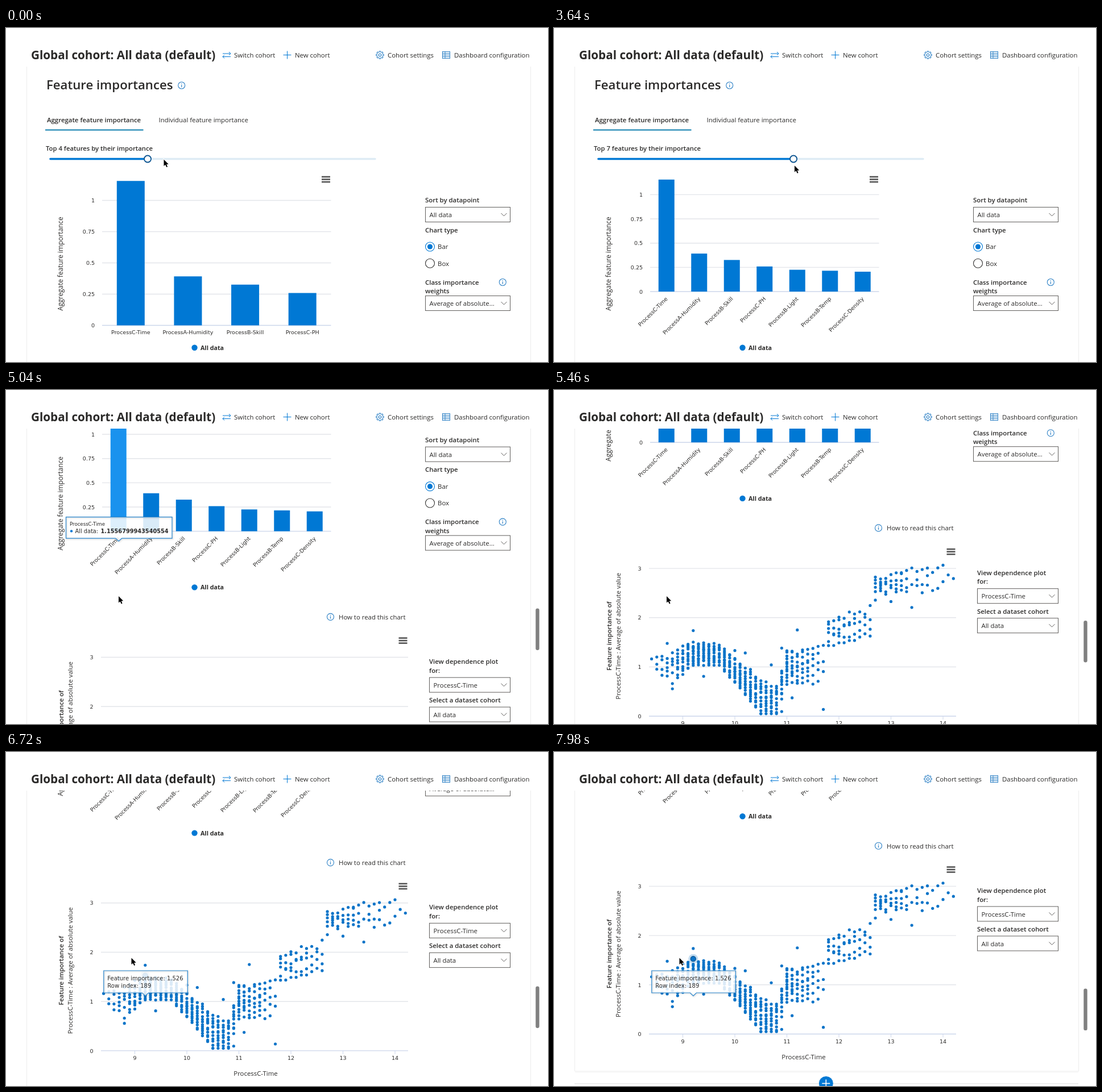
An HTML page with a canvas that plays this animation: 953x588 px, repeating every 8 s.

```html
<!DOCTYPE html>
<html lang="en">
<head>
<meta charset="utf-8">
<title>Feature importances</title>
<style>
  html, body { margin: 0; width: 100%; height: 100%; overflow: hidden; background: #fff; }
  canvas { display: block; }
</style>
</head>
<body>
<canvas id="stage" width="953" height="588"></canvas>
<script>
const ctx = document.getElementById('stage').getContext('2d');
const LOOP = 8000, STEP = 70;
const BLUE = '#0078d4', ICON = '#2f82c6', DOT = '#0b74c8', INK = '#2b2a29', GRID = '#e3e5ea', AXIS = '#ccd6eb';
const ui = (size, weight = 400) => `${weight} ${size}px "Open Sans", "Noto Sans", sans-serif`;
const label = (size, weight = 400) => `${weight} ${size}px "DejaVu Sans", sans-serif`;
const BODY = ui(11.4), STRONG = ui(11.4, 600), TICK = label(9.5);

const clamp = v => Math.max(0, Math.min(1, v));
const progress = (t, from, to) => clamp((t - from) / (to - from));
const mix = (a, b, p) => a + (b - a) * p;
const easeOut = p => 1 - (1 - p) ** 2.05;
const smooth = p => p * p * (3 - 2 * p);

// ---- drawing helpers ----
function text(str, x, y, font = BODY, align = 'left') {
  ctx.font = font;
  ctx.textAlign = align;
  ctx.fillStyle = INK;
  ctx.fillText(str, x, y);
}

function turned(str, x, y, angle, font, align = 'center') {
  ctx.save();
  ctx.translate(x, y);
  ctx.rotate(angle);
  text(str, 0, 0, font, align);
  ctx.restore();
}

function line(color, width, ...points) {
  ctx.strokeStyle = color;
  ctx.lineWidth = width;
  ctx.beginPath();
  for (let i = 0; i < points.length; i += 2) ctx.lineTo(points[i], points[i + 1]);
  ctx.stroke();
}

function circle(x, y, r, fill, stroke, width = 1.1) {
  ctx.beginPath();
  ctx.arc(x, y, r, 0, Math.PI * 2);
  if (fill) { ctx.fillStyle = fill; ctx.fill(); }
  if (stroke) { ctx.strokeStyle = stroke; ctx.lineWidth = width; ctx.stroke(); }
}

function box(color, x, y, width, height) {
  ctx.strokeStyle = color;
  ctx.lineWidth = 1;
  ctx.strokeRect(x + .5, y + .5, width - 1, height - 1);
}

function plus(color, x, y, width) {
  line(color, width, x - 7, y, x + 7, y);
  line(color, width, x, y - 7, x, y + 7);
}

function info(x, y) {
  circle(x, y, 6, null, ICON);
  line(ICON, 1.2, x, y - 1, x, y + 3.2);
  line(ICON, 1.2, x, y - 3.4, x, y - 2.2);
}

function burger(x, y) {
  for (const dy of [-4.5, 0, 4.5]) line('#555', 2.6, x - 7.5, y + dy, x + 7.5, y + dy);
}

function arrow(x, y, dir) {
  line(BLUE, 1, x - 7 * dir, y, x + 7 * dir, y);
  line(BLUE, 1, x + 4 * dir, y - 3, x + 7 * dir, y, x + 4 * dir, y + 3);
}

function gear(x, y) {
  ctx.beginPath();
  for (let i = 0; i < 32; i++) {
    const a = (i - .5) / 32 * Math.PI * 2, r = i % 4 < 2 ? 6.8 : 5.2;
    ctx.lineTo(x + r * Math.cos(a), y + r * Math.sin(a));
  }
  ctx.closePath();
  ctx.strokeStyle = ICON;
  ctx.lineWidth = 1.1;
  ctx.stroke();
  circle(x, y, 2.3, null, ICON);
}

function dropdown(x, y, width, value) {
  box('#605e5c', x, y, width, 27);
  text(value, x + 7.5, y + 18);
  const cx = x + width - 11.5;
  line('#605e5c', 1, cx - 5, y + 11, cx, y + 16, cx + 5, y + 11);
}

function radio(y, name, on) {
  circle(745.5, y, 8, '#fff', on ? BLUE : '#323130');
  if (on) circle(745.5, y, 4.6, BLUE);
  text(name, 759, y + 4.2);
}

// ---- page parts ----
function header() {
  text('Global cohort: All data (default)', 44, 54.5, ui(20.7, 700));
  arrow(388, 45, 1);
  arrow(388, 50.5, -1);
  text('Switch cohort', 401, 52);
  plus(BLUE, 494.5, 47.5, 1);
  text('New cohort', 508, 52);
  gear(657.5, 47.5);
  text('Cohort settings', 671, 52);
  box(ICON, 767, 41, 14, 13);
  line(ICON, 1, 772, 41, 772, 54);
  for (let y = 44.5; y < 53; y += 3) line(ICON, 1, 767, y, 781, y);
  text('Dashboard configuration', 788, 52);
}

const TRACK = 77, NOTCH = 57.35;

function slider(count, active) {
  const x = TRACK + (count - 1) * NOTCH;
  text(`Top ${count} features by their importance`, 70, 215.5, ui(11.3, 600));
  ctx.lineCap = 'round';
  line(active ? '#deecf5' : '#c8c6c4', 3.4, 78, 230.5, 649, 230.5);
  line(active ? BLUE : '#605e5c', 3.4, 78, 230.5, x, 230.5);
  ctx.lineCap = 'butt';
  circle(x, 230.5, 6, '#fff', active ? '#0d5591' : '#605e5c', 1.8);
}

const FEATURES = {
  'ProcessC-Time': 1.1557, 'ProcessA-Humidity': .392, 'ProcessB-Skill': .326, 'ProcessC-PH': .259,
  'ProcessB-Light': .225, 'ProcessB-Temp': .215, 'ProcessC-Density': .205
};

function barChart(count, hovered) {
  const flat = count === 4; // labels only fit upright with few bars
  const zero = flat ? 523.5 : 464, unit = flat ? 220 : 170.6;
  const slot = 402.5 / count, width = slot * .487;

  for (let v = 0; v <= 1; v += .25) {
    const y = zero - v * unit;
    line(v ? GRID : AXIS, 1.4, 169, y, 571.5, y);
    text(v, 156, y + 3.5, TICK, 'right');
  }
  Object.entries(FEATURES).slice(0, count).forEach(([name, value], i) => {
    const cx = 169 + slot * (i + .5);
    ctx.fillStyle = hovered && i === 0 ? '#1a92ee' : BLUE;
    ctx.fillRect(cx - width / 2, zero - value * unit, width, value * unit);
    if (flat) text(name, cx, 539, TICK, 'center');
    else turned(name, cx + 2.7, zero + 13.5, -Math.PI / 4, TICK, 'right');
  });
  turned('Aggregate feature importance', 99.5, 415, -Math.PI / 2, ui(11.85));
  burger(562.5, 266.5);
  circle(331.5, 562.7, 5.2, BLUE);
  text('All data', 342, 566.7, ui(10.7, 700));
}

function barOptions() {
  text('Sort by datapoint', 737, 307, STRONG);
  dropdown(737, 315, 150, 'All data');
  text('Chart type', 737, 359.5, STRONG);
  radio(385, 'Bar', true);
  radio(414.3, 'Box', false);
  text('Class importance', 737, 451.5, STRONG);
  text('weights', 737, 467.3, STRONG);
  info(873.3, 447.5);
  dropdown(737, 471, 150, 'Average of absolute...');
}

// Key points of the cloud: feature value, middle, half height, dots per column
const CLOUD = [
  [8.4, 1.1, .1, 1], [8.8, 1, .35, 7], [9.2, 1.27, .24, 15], [9.7, 1.25, .22, 11], [10.5, .38, .36, 14],
  [10.8, .33, .3, 11], [11, 1, .36, 13], [11.7, 1.05, .4, 4], [11.8, 1.7, .3, 6], [12.6, 1.9, .35, 4],
  [12.7, 2.65, .15, 6], [14.2, 2.85, .4, 1]
];

function cloudAt(x) {
  const i = Math.max(1, CLOUD.findIndex(row => row[0] >= x));
  const a = CLOUD[i - 1], b = CLOUD[i];
  return a.map((v, k) => mix(v, b[k], progress(x, a[0], b[0])));
}

function buildDots() {
  let seed = 189;
  const random = () => (seed = seed * 16807 % 2147483647) / 2147483647;
  const dots = [];
  for (let k = 84; k <= 142; k++) {
    const [x, middle, half, density] = cloudAt(k / 10);
    const count = Math.floor(density + random());
    for (let i = 0; i < count; i++) {
      const reach = random() < .07 ? 2.3 : 1;
      const v = middle + half * reach * (2 * (i + random()) / count - 1);
      dots.push([x, Math.max(.05, v)]);
    }
  }
  return dots;
}
const DOTS = buildDots();
const plotX = v => 226.5 + (v - 9) * 91.5;
const plotY = v => 946 - v * 86.7;

function scatterChart(showDots, hovered) {
  info(570.5, 614.7);
  text('How to read this chart', 585, 619);
  burger(698, 656.5);
  for (let v = 0; v <= 3; v++) {
    line(v ? GRID : AXIS, 1.4, 167, plotY(v), 707, plotY(v));
    text(v, 153.5, plotY(v) + 3.7, TICK, 'right');
  }
  for (let v = 9; v <= 14; v++) {
    line(AXIS, 1, plotX(v), 946, plotX(v), 952);
    text(v, plotX(v), 962, TICK, 'center');
  }
  turned('Feature importance of', 101, 805, -Math.PI / 2, ui(11.3, 600));
  turned('ProcessC-Time : Average of absolute value', 117, 805, -Math.PI / 2, BODY);
  text('ProcessC-Time', 439, 990.5, BODY, 'center');

  if (showDots) for (const [x, v] of DOTS) circle(plotX(x), plotY(v), 2.6, DOT);
  if (hovered) {
    const x = plotX(9.2), y = plotY(1.526);
    circle(x, y, 8.5, 'rgba(11,116,200,.25)');
    circle(x, y, 4.6, DOT, '#0c4f88');
  }
}

function scatterOptions() {
  text('View dependence plot', 744, 697.5, STRONG);
  text('for:', 744, 713.3, STRONG);
  dropdown(744, 721, 143, 'ProcessC-Time');
  text('Select a dataset cohort', 744, 765.5, STRONG);
  dropdown(744, 773, 143, 'All data');
}

function page(count, sliderActive, barHovered, showDots, dotHovered) {
  line('#ededed', 1, 36.5, 60, 36.5, 1011.5, 922.5, 1011.5, 922.5, 60);
  line('#f5f5f5', 1.5, 37, 1013, 922, 1013);
  text('Feature importances', 71, 108, ui(22.2, 600));
  info(308.7, 101);
  text('Aggregate feature importance', 72, 166, STRONG);
  text('Individual feature importance', 268.5, 166);
  line('#0f7fae', 2, 69, 179.5, 241.5, 179.5);

  slider(count, sliderActive);
  barChart(count, barHovered);
  barOptions();
  scatterChart(showDots, dotHovered);
  scatterOptions();

  line('#e6e6e6', 1.3, 36, 1033.5, 922, 1033.5);
  circle(478.3, 1033, 13, BLUE, '#fff', 1);
  plus('#fff', 478.3, 1033, 1.6);
}

// Tooltip with a pointer centred on its lower edge
function bubble(x, y, width, height, tip, alpha, content) {
  const cx = width / 2 - .7;
  ctx.save();
  ctx.globalAlpha = alpha;
  ctx.translate(x, y);
  const shape = new Path2D(`M0 0H${width}V${height}H${cx + 5.5}L${cx} ${height + tip}L${cx - 5.5} ${height}H0Z`);
  ctx.fillStyle = 'rgba(255,255,255,.85)';
  ctx.fill(shape);
  ctx.shadowColor = 'rgba(0,0,0,.25)';
  ctx.shadowBlur = 3;
  ctx.shadowOffsetX = ctx.shadowOffsetY = 1;
  ctx.strokeStyle = '#2b88d0';
  ctx.lineWidth = 1.2;
  ctx.stroke(shape);
  ctx.shadowColor = 'transparent';
  content();
  ctx.restore();
}

// Tooltips glide to rest, nearly halving the distance left at each step
const glide = (t, start) => .55 ** ((t - start) / STEP);

function barBubble(t) {
  const away = glide(t, 4130), alpha = 1 - progress(t, 5250, 5460);
  bubble(105.5 + 40 * away, 223.7 + 29 * away, 186.5, 37.5, 5, alpha, () => {
    text('ProcessC-Time', 6.5, 15, label(8.6));
    circle(9.5, 24.7, 2.2, BLUE);
    text('All data:', 16, 28, label(9.8));
    text('1.1556799943540554', 61, 28, label(9.75, 700));
  });
}

function dotBubble(t) {
  const away = glide(t, 5740);
  bubble(171.8 + 25 * away, 385 - 75 * away, 147.5, 39, 5.5, 1, () => {
    text('Feature importance: 1.526', 6.5, 16.8, label(10));
    text('Row index: 189', 6.5, 29.8, label(10));
  });
}

function scrollbar(scroll, alpha) {
  ctx.globalAlpha = alpha;
  ctx.fillStyle = '#808080';
  ctx.beginPath();
  ctx.roundRect(931.3, 355 + scroll * .137, 6.4, 73.5, 3.2);
  ctx.fill();
  ctx.globalAlpha = 1;
}

// Pointer moves: start time, end time, destination
const MOVES = [
  [0, 280, 284, 232], [490, 700, 322, 234], [770, 1750, 429, 239],
  [3570, 4270, 212.5, 351], [4760, 5040, 198, 363], [5600, 6020, 220.5, 362.5]
];
const DROP = 1750;

function pointerAt(t) {
  let x = 277.5, y = 231.5;
  for (const [from, to, toX, toY] of MOVES) {
    const p = smooth(progress(t, from, to));
    x = mix(x, toX, p);
    y = mix(y, toY, p);
  }
  return [x, y];
}

const ARROW = new Path2D('M0 0V11.6L2.7 9.2L4.7 13.6L6.6 12.8L4.7 8.5L8.2 8.3Z');

function pointer(t) {
  ctx.save();
  ctx.translate(...pointerAt(t));
  ctx.strokeStyle = '#fff';
  ctx.lineWidth = 2;
  ctx.stroke(ARROW);
  ctx.fillStyle = '#000';
  ctx.fill(ARROW);
  ctx.restore();
}

function draw(t) {
  // The handle snaps to the notch nearest the dragging pointer
  const [dragX] = pointerAt(Math.min(t, DROP));
  const count = Math.round((dragX - TRACK) / NOTCH) + 1;
  const scroll = 381.5 * easeOut(progress(t, 4760, 5600)) + 68 * smooth(progress(t, 6300, 7070));

  ctx.fillStyle = '#fff';
  ctx.fillRect(0, 0, 953, 588);
  header();
  ctx.save();
  ctx.beginPath();
  ctx.rect(0, 68, 953, 520);
  ctx.clip();
  ctx.translate(0, -scroll);
  page(count, t < 3710, t >= 4130 && t < 5250, t >= 5250, t >= 5740);
  ctx.restore();

  if (t >= 4830) scrollbar(scroll, t < 6300 ? 1 - progress(t, 5600, 6020) : 1);
  if (t >= 4130 && t < 5460) barBubble(t);
  if (t >= 5740) dotBubble(t);
  pointer(t);
}

function frame() {
  const t = performance.now() % LOOP;
  draw(Math.floor(t / STEP) * STEP);
  requestAnimationFrame(frame);
}
frame();
</script>
</body>
</html>
```
